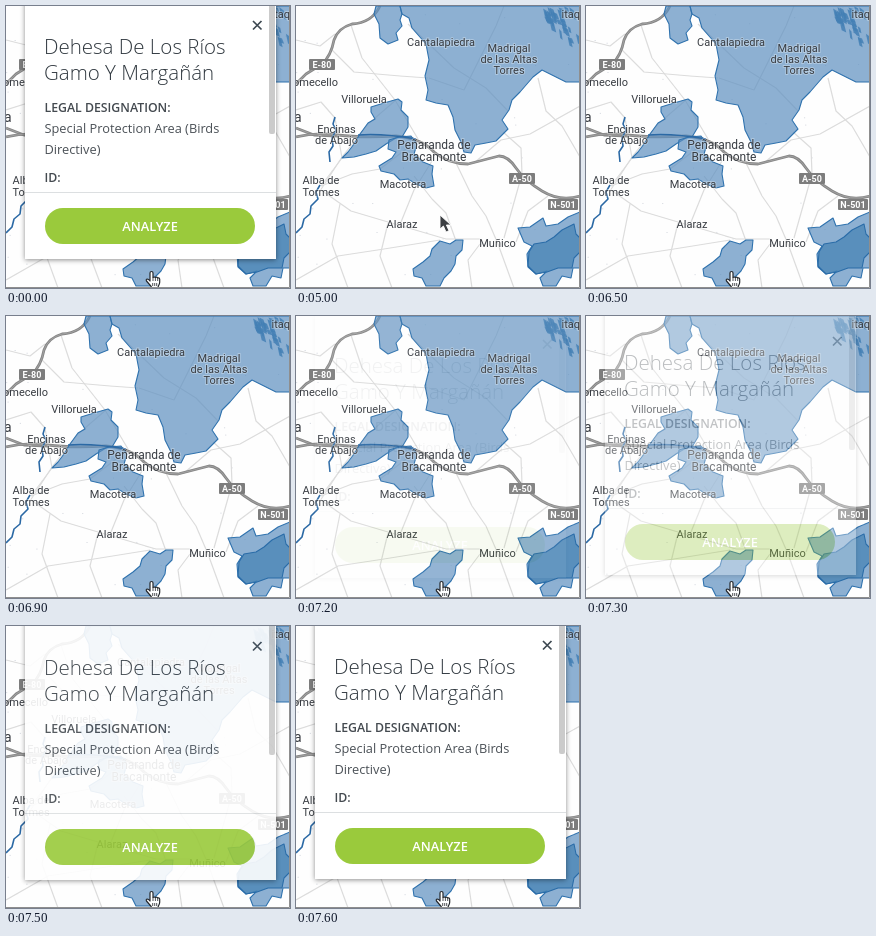
An HTML page that plays this animation: 284x282 px, repeating every 7.7 s.

```html
<!DOCTYPE html>
<html lang="es">
<head>
<meta charset="utf-8">
<title>Protected area map</title>
<style>
  html, body { margin: 0; width: 100%; height: 100%; overflow: hidden; background: #fff; }
  svg { display: block; width: 284px; height: 282px; }
  path { stroke-linejoin: round; }
  .minor { fill: none; stroke: #dcdcdc; stroke-width: 1.2; }
  .casing { fill: none; stroke: #868686; stroke-width: 2.8; }
  .center { fill: none; stroke: #a9a9a9; stroke-width: .8; }
  .area { fill: #5f90c0; fill-opacity: .7; stroke: #2f72ae; stroke-width: 1.1; }
  .dark { fill: #4482b4; stroke: #2a6ca8; }
  .sliver { fill: #4480b5; fill-opacity: .85; }
  .river { fill: none; stroke: #2b69a5; stroke-width: 1.6; }
  .label { font-family: Roboto, Arial, sans-serif; fill: #383c42; text-anchor: middle;
    paint-order: stroke; stroke: #fff; stroke-opacity: .3; stroke-width: 2px; }
  .shield { font: 700 9px Roboto, Arial, sans-serif; fill: #fff; text-anchor: middle; }
  .card { font-family: "Open Sans", "Noto Sans", sans-serif; fill: #4b5157; }
  .title { font-size: 20.5px; font-weight: 300; fill: #30383f; }
  .head { font-size: 12.3px; font-weight: 600; fill: #444a50; }
  .body { font-size: 12.8px; }
  .action { font-size: 12.8px; font-weight: 600; fill: #fff; text-anchor: middle; }
  .panel { filter: drop-shadow(0 1px 2.5px rgba(0, 0, 0, .45)); }
</style>
</head>
<body>
<svg viewBox="0 0 284 282">
  <rect width="284" height="282" fill="#fefefe"/>
  <g id="map"></g>
  <g id="card" class="card">
    <path class="panel" d="M19-12H270V253H19Z" fill="#fff"/>
    <rect x="263" y="-12" width="6" height="140" rx="2" fill="#cbcbcb"/>
    <path d="M19 186.5H270" stroke="#dcdfe1"/>
    <path d="M247 15l8.500 8.500M255.500 15l-8.500 8.500" stroke="#3d4851" stroke-width="1.7"/>
    <text class="title" x="38" y="47.500">Dehesa De Los Ríos</text>
    <text class="title" x="38" y="74">Gamo Y Margañán</text>
    <text class="head" x="38.500" y="106">LEGAL DESIGNATION:</text>
    <text class="body" x="38.500" y="127">Special Protection Area (Birds</text>
    <text class="body" x="38.500" y="148">Directive)</text>
    <text class="head" x="38.500" y="176">ID:</text>
    <rect x="39" y="202" width="210" height="36" rx="18" fill="#9aca3c"/>
    <text class="action" x="144" y="224.500">ANALYZE</text>
  </g>
  <g id="arrow">
    <path d="M0 0V14L3.400 11L6 17L9 15.700L6.400 10H11Z" fill="#3c3f43" stroke="#fff" stroke-width=".9"/>
  </g>
  <g id="hand">
    <path d="M4.500 9V2a1.500 1.500 0 0 1 3 0V6.500q1.200-1 2.400 0q1.300-.8 2.300.4q1.800-.4 2 1.400v3q0 2-1.500 4V17h-7v-1.500L1 10q-.8-1.800.8-2q1.200 0 2.700 2z"
      fill="#fff" stroke="#25282c" stroke-width="1.200"/>
    <path d="M7.500 6.500V10M9.900 6.500V10M12.200 7V10M7.200 12V15M9.200 12V15M11.200 12V15" fill="none" stroke="#25282c" stroke-width=".8"/>
  </g>
  <path d="M0 281.500H283.500V0" fill="none" stroke="#8e8e8e"/>
</svg>
<script>
const $ = id => document.getElementById(id);
const map = $("map");

function add(tag, attrs, text) {
  const el = document.createElementNS("http://www.w3.org/2000/svg", tag);
  for (const key in attrs) el.setAttribute(key, attrs[key]);
  if (text) el.textContent = text;
  map.append(el);
}
const line = (cls, d) => add("path", { class: cls, d: "M" + d });
const area = (d, cls = "area") => line(cls, d + "Z");

let seed = 17;
const random = () => (seed = seed * 16807 % 2147483647) / 2147483647;

// Faint terrain specks
for (let i = 0; i < 50; i++) {
  add("rect", { x: random() * 282, y: random() * 280, width: 1.2, height: 1, fill: "#d9dce2" });
}

[
  "0 34L24 40L39 28",
  "55 19L66 52L99 94L122 133",
  "36 44L58 66L104 70L132 72",
  "0 104L25 96L39 112L46 152L25 180",
  "100 94L72 118L46 151L24 185",
  "25 180L56 168L84 163L122 134",
  "25 184L55 205L92 216L150 233H184",
  "0 274L42 250L88 243L144 234",
  "44 198L36 238L52 282",
  "92 217L84 250L96 282",
  "118 170L136 193L150 207L160 235",
  "136 155L118 184L105 216",
  "160 157L176 190L190 210L202 238L218 282",
  "178 157L205 134L234 128L284 100",
  "207 126L225 142L226 168L208 232",
  "242 72L250 105L266 120L284 151",
  "220 236L232 205L252 190",
  "184 238L172 254L176 282",
  "112 18L158 62L190 82L212 105",
  "133 72L168 84L200 20L208 0"
].forEach(d => line("minor", d));

// Main roads
for (const d of [
  "0 78L10 68L26 58Q35 50 38 34Q42 22 56 18Q76 17 84 0",
  "0 122L18 129L42 130",
  "0 131Q20 126 42 129T100 130Q125 132 138 146Q152 158 172 158L203 150Q212 150 220 162T246 185T284 190"
]) {
  line("casing", d);
  line("center", d);
}

// Protected areas
area("80 0L78 8L83 18L84 32L92 38L102 34L100 27L106 20L104 14L106 8L104 0");
area("104 0L106 8L113 12L116 22L130 38L133 54L129 70L132 84L130 94L140 97L152 99L157 111L159 124L165 136L168 146L175 147L179 139L190 137L200 135L212 123L206 114L213 104L216 94L224 86L237 71L246 64L258 70L270 76L284 76V0");
area("75 101L88 97L102 93L106 96L105 104L112 111L112 121L106 131L100 132L90 138L80 145L70 148L58 151L46 152L52 146L58 138L64 128L72 117L79 113L75 106");
area("93 134L103 131L115 130L121 138L118 148L127 156L137 160L136 168L138 180L130 182L120 178L112 173L104 174L98 168L85 165L83 160L96 152L100 146L92 143");
area("144 235L154 238L160 234L167 234L166 244L160 250L159 258L155 265L148 272L144 280H130L126 272L118 270L117 263L127 256L134 250L136 243");
area("222 222L234 221L247 212L250 220L262 218L272 211L284 206V262L277 262L275 272L266 270L260 280H247L244 272L251 265L240 268L232 261L231 248L236 240L228 236");
area("238 238L250 236L258 231L266 224L278 218L280 228L284 232V246L278 252L276 262L262 262L251 266L240 268L232 260L233 246", "area dark");

// Slanted wetland strips, thinning out towards the south-west
for (let i = 0; i < 34; i++) {
  const x = 246 + random() * 36, y = random() * 44 * (x - 236) / 48;
  const w = 2 + random() * 3, h = 4 + random() * 6;
  area(`${x} ${y}l${w} ${h / 3}l${w / 2} ${h}l${-w} ${-h / 4}`, "sliver");
}

line("river", "39 111L37 118L40 124L36 132L37 140L33 146L34 156");
line("river", "24 179L20 186L22 193L15 200L14 208L8 213L6 221L0 227");
line("river", "62 129Q86 127 120 133");

function shield(x, y, w, text) {
  add("rect", { x: x - w / 2, y: y - 5.5, width: w, height: 11, rx: 1, fill: "#7d7d7d" });
  add("text", { class: "shield", x, y: y + 3.2 }, text);
}
shield(26, 58.5, 26, "E-80");
shield(226, 172.5, 26, "A-50");
shield(267, 198.5, 30, "N-501");

const label = (text, x, y, size = 11, anchor = "middle") =>
  add("text", { class: "label", x, y, style: `font-size:${size}px;text-anchor:${anchor}` }, text);
label("Cantalapiedra", 145, 40);
label("Madrigal", 213, 46);
label("de las Altas", 213, 57);
label("Torres", 213, 68);
label("Gomecello", 42, 80, 11, "end");
label("Villoruela", 68, 97);
label("Encinas", 40.5, 127);
label("de Abajo", 40.5, 138);
label("Peñaranda de", 138, 143, 12);
label("Bracamonte", 138, 155, 12);
label("Alba de", 25, 178);
label("Tormes", 25, 190);
label("Macotera", 107, 182);
label("Alaraz", 106, 222);
label("Muñico", 201.5, 241);
label("itaq", 284, 12, 11, "end");
label("Salamanca", 5.5, 116, 14, "end");

// Card fade: time, opacity, vertical offset
const cardSteps = [
  [0, 1, 0], [5000, 0, 9], [7200, .06, 9], [7300, .32, 6],
  [7400, .66, 3], [7500, .9, 1], [7600, 1, 0]
];
const LOOP = 7700, STEP = 100;
const clamp = v => Math.min(1, Math.max(0, v));
const smooth = v => v * v * (3 - 2 * v);

function cursorY(t) {
  if (t < 5000) return 265;
  return 209 + 49 * smooth(clamp((t - 5000) / 800)) + 7 * smooth(clamp((t - 5800) / 700));
}

function draw(now) {
  const t = Math.floor(now % LOOP / STEP) * STEP;
  const [, opacity, dy] = cardSteps.filter(step => step[0] <= t).pop();
  const card = $("card");
  card.setAttribute("opacity", opacity);
  card.setAttribute("transform", `translate(0 ${dy})`);

  const y = cursorY(t);
  const pointing = y >= 236;
  $("arrow").setAttribute("transform", `translate(144 ${y})`);
  $("hand").setAttribute("transform", `translate(139.5 ${y})`);
  $("arrow").style.display = pointing ? "none" : "";
  $("hand").style.display = pointing ? "" : "none";
}

const start = performance.now();
function tick() {
  draw(performance.now() - start);
  requestAnimationFrame(tick);
}
draw(0);
requestAnimationFrame(tick);
</script>
</body>
</html>
```
